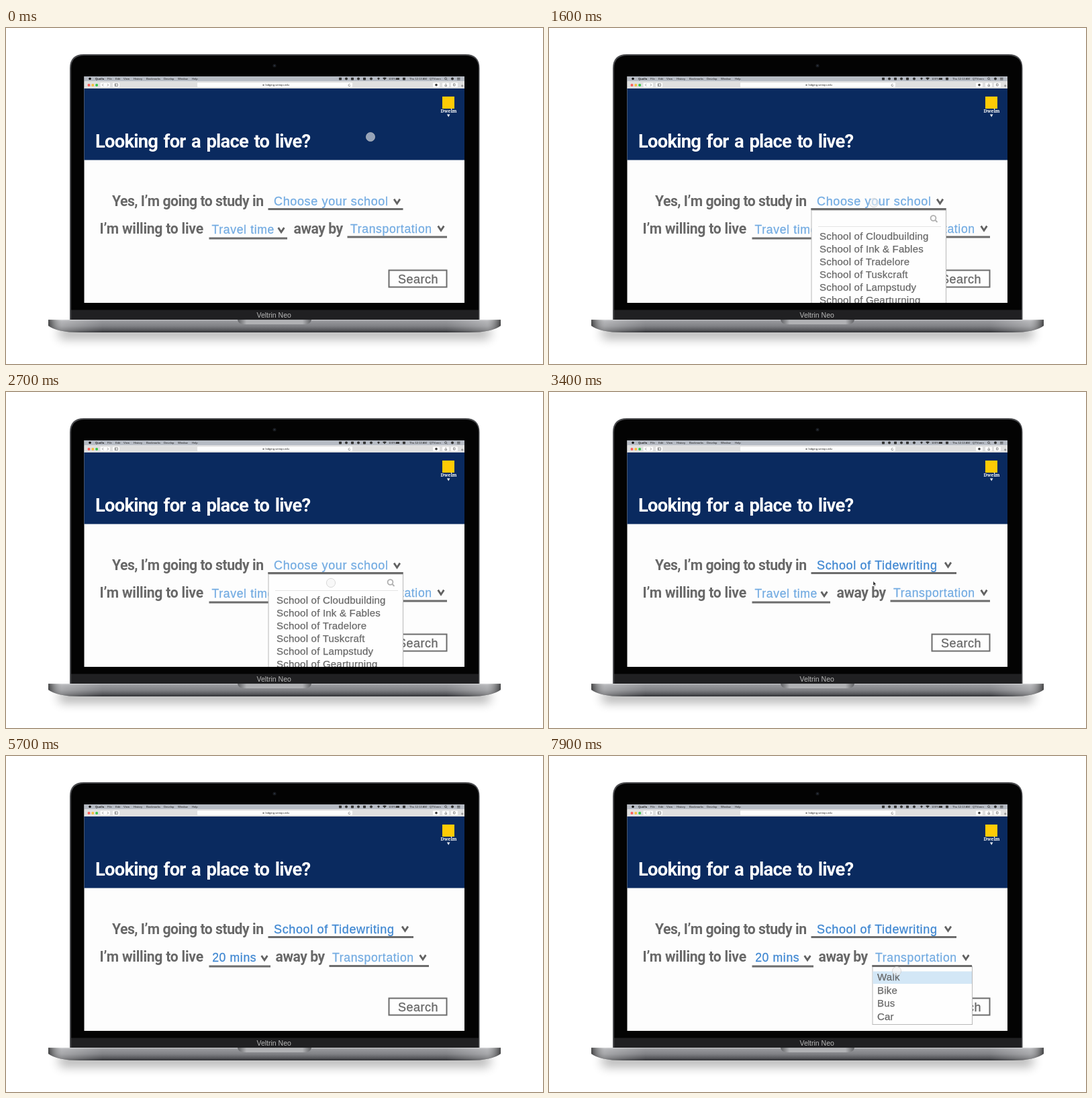
An HTML page for the animation above (8 s loop, 800 px wide and 500 px high).

```html
<!DOCTYPE html>
<html lang="en">
<head>
<meta charset="utf-8">
<title>Housing search</title>
<style>
html, body { margin: 0; width: 100%; height: 100%; overflow: hidden; background: #fff; }
svg { display: block; width: 800px; height: 500px; }
text { font-family: "Liberation Sans", Arial, sans-serif; white-space: pre; }
.title { font: 700 27.4px Roboto, sans-serif; letter-spacing: -.8px; word-spacing: 2.5px; fill: #fff; }
.label { font: 700 21.2px Roboto, sans-serif; letter-spacing: -.48px; fill: #686868; }
.label.wide { letter-spacing: -.25px; }
.pick { font-size: 18px; letter-spacing: .64px; fill: #74ace2; stroke: #74ace2; stroke-width: .3px; }
.pick.small { font-size: 17.6px; }
.pick.set { fill: #4088d2; stroke: #4088d2; }
.item { font-size: 15px; letter-spacing: .22px; fill: #686868; stroke: #686868; stroke-width: .25px; }
.unit { font-size: 14.3px; letter-spacing: .6px; fill: #6a6a6a; stroke: #6a6a6a; stroke-width: .4px; }
.line { stroke: #6c6c6c; stroke-width: 3; }
.chev { fill: none; stroke: #626262; stroke-width: 2.8; }
.panel { fill: #fefefe; stroke: #b8b8b8; }
.thin { stroke: #e4e4e4; }
.tiny { font-size: 4.2px; fill: #222; }
</style>
</head>
<body>
<svg viewBox="0 0 800 500">
  <defs>
    <linearGradient id="base" x2="0" y2="1">
      <stop offset="0" stop-color="#c4c5c8"/>
      <stop offset=".12" stop-color="#97989c"/>
      <stop offset=".5" stop-color="#808185"/>
      <stop offset=".8" stop-color="#5a5b5f"/>
      <stop offset="1" stop-color="#2e2f32"/>
    </linearGradient>
    <linearGradient id="sheen">
      <stop offset="0" stop-color="#222" stop-opacity=".7"/>
      <stop offset=".03" stop-color="#fff" stop-opacity=".3"/>
      <stop offset=".12" stop-color="#fff" stop-opacity="0"/>
      <stop offset=".88" stop-color="#fff" stop-opacity="0"/>
      <stop offset=".97" stop-color="#fff" stop-opacity=".3"/>
      <stop offset="1" stop-color="#222" stop-opacity=".7"/>
    </linearGradient>
    <linearGradient id="notch">
      <stop offset="0" stop-color="#606164"/>
      <stop offset=".12" stop-color="#b0b1b4"/>
      <stop offset=".88" stop-color="#b0b1b4"/>
      <stop offset="1" stop-color="#606164"/>
    </linearGradient>
    <filter id="soft" x="-10%" y="-150%" width="120%" height="400%"><feGaussianBlur stdDeviation="8"/></filter>
    <clipPath id="screen"><rect x="116.5" y="72" width="566.5" height="337"/></clipPath>
    <path id="chev" class="chev" d="M-4.4-3.9 0 2.7 4.4-3.9"/>
    <path id="deck" d="M63 434H737V443Q724 453 690 453H110Q76 453 63 443Z"/>
    <g id="lens" fill="none"><circle r="3.9"/><path d="M3 3 6 6"/></g>
  </defs>

  <!-- laptop -->
  <rect x="78" y="446" width="644" height="16" rx="7" opacity=".32" filter="url(#soft)"/>
  <path d="M95 434V60Q95 39 116 39H684.5Q705.5 39 705.5 60V434Z" fill="#4b4c4f"/>
  <path d="M97 434V60Q97 41 117 41H684Q704 41 704 60V434Z" fill="#030303"/>
  <rect x="97" y="419.5" width="607" height="14.5" fill="#202022"/>
  <circle cx="400" cy="56" r="2.6" fill="#17191d"/>
  <circle cx="400" cy="56" r="1" fill="#2b3442"/>
  <text x="373.5" y="430.5" font-size="10.5" fill="#b8b8b8">Veltrin Neo</text>
  <use href="#deck" fill="url(#base)"/>
  <use href="#deck" fill="url(#sheen)"/>
  <path d="M345 434H455Q454 441 445 441H355Q346 441 345 434Z" fill="url(#notch)"/>

  <g clip-path="url(#screen)">
    <rect x="116" y="72" width="567" height="337" fill="#fdfdfd"/>

    <!-- menu bar and toolbar -->
    <rect x="116" y="72" width="567" height="7.5" fill="#b6bbc4"/>
    <rect x="116" y="79.5" width="567" height="10.5" fill="#e0e0e0"/>
    <circle cx="125" cy="75.5" r="1.8" fill="#111"/>
    <g id="menu"></g>
    <g id="tray" fill="#333"></g>
    <circle cx="123.5" cy="85" r="2" fill="#fc5b57"/>
    <circle cx="129.3" cy="85" r="2" fill="#f5bd3e"/>
    <circle cx="135.1" cy="85" r="2" fill="#34c648"/>
    <g fill="#fcfcfc">
      <rect x="140.5" y="81.5" width="14.5" height="6.5" rx="1"/>
      <rect x="159" y="81.5" width="10" height="6.5" rx="1"/>
      <rect x="285" y="81.3" width="231" height="6.8" rx="1"/>
      <rect x="636" y="81.5" width="10" height="6.5" rx="1"/>
      <rect x="650" y="81.5" width="10" height="6.5" rx="1"/>
      <rect x="663" y="81.5" width="10" height="6.5" rx="1"/>
    </g>
    <g fill="none" stroke="#666" stroke-width=".7">
      <path d="M145 83.2 143.5 84.8 145 86.4M151 83.2 152.5 84.8 151 86.4"/>
      <path d="M162 83h4.5v3.5h-4.5zM163.5 83v3.5M512.5 84a1.5 1.5 0 1 0 .5 1.5"/>
      <path d="M654 84.5v2.2h2.5v-2.2M655.2 85.5v-3M666.5 83h2.5v3h-2.5zM678 86h3.5M679.7 84.3v3.5"/>
    </g>
    <circle cx="641" cy="84.8" r="1.8" fill="#333"/>
    <rect x="382.5" y="83.8" width="2" height="2.2" fill="#777"/>
    <text class="tiny" x="386.5" y="86.3">lodging.vemqo.edu</text>

    <!-- header -->
    <rect x="116" y="90" width="567" height="106.5" fill="#0a2a5f"/>
    <text class="title" x="133" y="178">Looking for a place to live?</text>
    <rect x="650" y="102" width="18" height="18" fill="#ffcb05"/>
    <text x="659.5" y="126" text-anchor="middle" fill="#fff" style="font:600 6.8px 'Noto Serif',serif">Dwelm</text>
    <path d="M657 128.5h4.4l-2.2 4z" fill="#fff"/>

    <!-- form -->
    <text class="label" x="158" y="265">Yes, I’m going to study in</text>
    <text class="label wide" x="139.5" y="305.5">I’m willing to live</text>

    <g data-on="0 3200">
      <text class="pick" x="399" y="264">Choose your school</text>
      <use href="#chev" x="582.5" y="258.5"/>
      <path class="line" d="M390.5 269.5H591.5"/>
    </g>
    <g data-on="3200 8000">
      <text class="pick set" x="399" y="264">School of Tidewriting</text>
      <use href="#chev" x="594.5" y="257.5"/>
      <path class="line" d="M390.5 269.5H607"/>
    </g>

    <g data-on="0 5700">
      <text class="pick small" x="306.6" y="306">Travel time</text>
      <use href="#chev" x="410" y="301"/>
      <path class="line" d="M302.5 313H419"/>
    </g>
    <g data-on="5700 8000">
      <text class="pick small set" x="307.2" y="305.5">20 mins</text>
      <use href="#chev" x="385" y="301"/>
      <path class="line" d="M302.5 313H394"/>
    </g>

    <text id="away" class="label" y="305.5">away by</text>
    <g id="travel">
      <text class="pick small" x="513" y="304.8">Transportation</text>
      <use href="#chev" x="648" y="298.5"/>
      <path class="line" d="M508.5 311H657"/>
    </g>

    <rect x="570.5" y="360.5" width="86" height="25" fill="#fefefe" stroke="#6c6c6c" stroke-width="2"/>
    <text x="584" y="379.5" font-size="18" letter-spacing=".5" fill="#686868" stroke="#686868" stroke-width=".3">Search</text>

    <!-- school list -->
    <g data-on="800 3200">
      <rect id="schoolBox" class="panel" x="391" y="271" width="200.5" height="150"/>
      <path class="line" d="M390.5 269.5H591.5"/>
      <use href="#lens" x="572.5" y="283" stroke="#b0b0b0" stroke-width="1.8"/>
      <path class="thin" d="M401 295.5H584"/>
      <text id="query" class="item" x="404" y="289"></text>
      <g id="schools" data-on="800 3000"></g>
      <text class="item" data-on="3000 3200" x="403" y="315">School of Tidewriting</text>
    </g>

    <!-- travel time entry -->
    <g data-on="4300 5700">
      <rect class="panel" x="302.5" y="313.5" width="179.5" height="23"/>
      <path class="line" d="M302.5 313H419"/>
      <path class="thin" d="M310 331.5H343M389 331.5H420"/>
      <text class="unit" x="345.5" y="331">hours</text>
      <text class="unit" x="422.5" y="331">minutes</text>
      <text id="mins" class="unit" x="399" y="330"></text>
    </g>

    <!-- transport list -->
    <g data-on="6900 8000">
      <rect class="panel" x="482" y="313" width="148.5" height="86.5"/>
      <path class="line" d="M481.5 312.5H630"/>
      <rect data-on="7400 8000" x="482.5" y="320.5" width="147.5" height="18.5" fill="#d3e7f6"/>
      <g id="modes"></g>
    </g>

    <!-- pointer -->
    <circle id="dot" r="6.6" fill="#f4f4f4" fill-opacity=".6" stroke="#c4c4c4" stroke-opacity=".6"/>
    <path data-on="3400 3500" d="M483 281.5v6.5l1.5-1.3 1 2.1 1-.5-1-2h2z" fill="#222" stroke="#fff" stroke-width=".4"/>
  </g>
</svg>

<script>
const LOOP = 8000, STEP = 100;
const $ = id => document.getElementById(id);

function add(parent, tag, attrs, text = '') {
  const el = document.createElementNS('http://www.w3.org/2000/svg', tag);
  for (const key in attrs) el.setAttribute(key, attrs[key]);
  el.textContent = text;
  $(parent).append(el);
}

const word = (x, s, bold) => add('menu', 'text',
  { class: 'tiny', x, y: 77, 'font-weight': bold ? 700 : 400 }, s);
word(133, 'Quolla', true);
[[151, 'File'], [163, 'Edit'], [175, 'View'], [190, 'History'], [209, 'Bookmarks'],
 [235, 'Develop'], [256, 'Window'], [277, 'Help'], [570, '100%'],
 [601, 'Thu 12:13 AM'], [631, 'QTVoren']].forEach(([x, s]) => word(x, s));

// status icons
[498, 516, 534, 593].forEach(x => add('tray', 'rect', { x: x - 2, y: 73.8, width: 4, height: 3.6, rx: .6 }));
[507, 525, 544, 665].forEach(x => add('tray', 'circle', { cx: x, cy: 75.6, r: 2 }));
add('tray', 'path', { d: 'M553 75l2-1.5 2 1.5-2 2.5zM561 74.5q3-2 6 0l-3 3zM581 74.3h5v2.8h-5z' });
add('tray', 'path', { d: 'M672 74.3h4.5M672 75.7h4.5M672 77.1h4.5', stroke: '#333', 'stroke-width': .7 });
add('tray', 'use', { href: '#lens', transform: 'translate(655 75.3) scale(.38)', stroke: '#333', 'stroke-width': 1.8 });

['Cloudbuilding', 'Ink & Fables', 'Tradelore', 'Tuskcraft', 'Lampstudy', 'Gearturning']
  .forEach((name, i) => add('schools', 'text', { class: 'item', x: 403, y: 315 + i * 19 }, 'School of ' + name));
['Walk', 'Bike', 'Bus', 'Car']
  .forEach((name, i) => add('modes', 'text', { class: 'item', x: 489, y: 334 + i * 19.6 }, name));

// pointer stops: time, x, y
const path = [
  [0, 543, 162], [700, 484, 260], [1900, 484, 260], [2600, 484, 284],
  [3400, 484, 284], [4200, 384, 302], [4800, 384, 302], [5200, 404, 326],
  [6000, 404, 328], [6700, 517, 309], [7000, 517, 309], [7400, 518, 326],
  [7600, 518, 326], [7900, 518, 320], [8000, 518, 320]
];
const hidden = [[2800, 3500], [5300, 6000]];

function pointAt(t) {
  const i = path.findIndex(p => p[0] > t);
  const [t0, x0, y0] = path[i - 1], [t1, x1, y1] = path[i];
  const k = (t - t0) / (t1 - t0), e = k * k * (3 - 2 * k);
  return [x0 + (x1 - x0) * e, y0 + (y1 - y0) * e];
}

const between = (t, a, b) => t >= a && t < b;
const show = (el, on) => { el.style.display = on ? '' : 'none'; };
const typed = (s, t, start, pace) => s.slice(0, Math.max(0, Math.floor((t - start) / pace) + 1));

const timed = [...document.querySelectorAll('[data-on]')]
  .map(el => [el, ...el.dataset.on.split(' ').map(Number)]);

function draw(now) {
  const t = Math.floor((now % LOOP) / STEP) * STEP;
  const moved = t >= 5700;
  timed.forEach(([el, a, b]) => show(el, between(t, a, b)));
  $('away').setAttribute('x', moved ? 401.5 : 428.5);
  $('travel').setAttribute('transform', moved ? 'translate(-27 1.5)' : '');
  $('schoolBox').setAttribute('height', t < 3000 ? 150 : 50);
  $('query').textContent = typed('tide', t, 2800, 100);
  $('mins').textContent = typed('20', t, 5300, 200);
  const [x, y] = pointAt(t);
  $('dot').setAttribute('transform', `translate(${x} ${y})`);
  show($('dot'), !hidden.some(([a, b]) => between(t, a, b)));
}

function tick() {
  draw(performance.now());
  requestAnimationFrame(tick);
}
tick();
</script>
</body>
</html>
```
